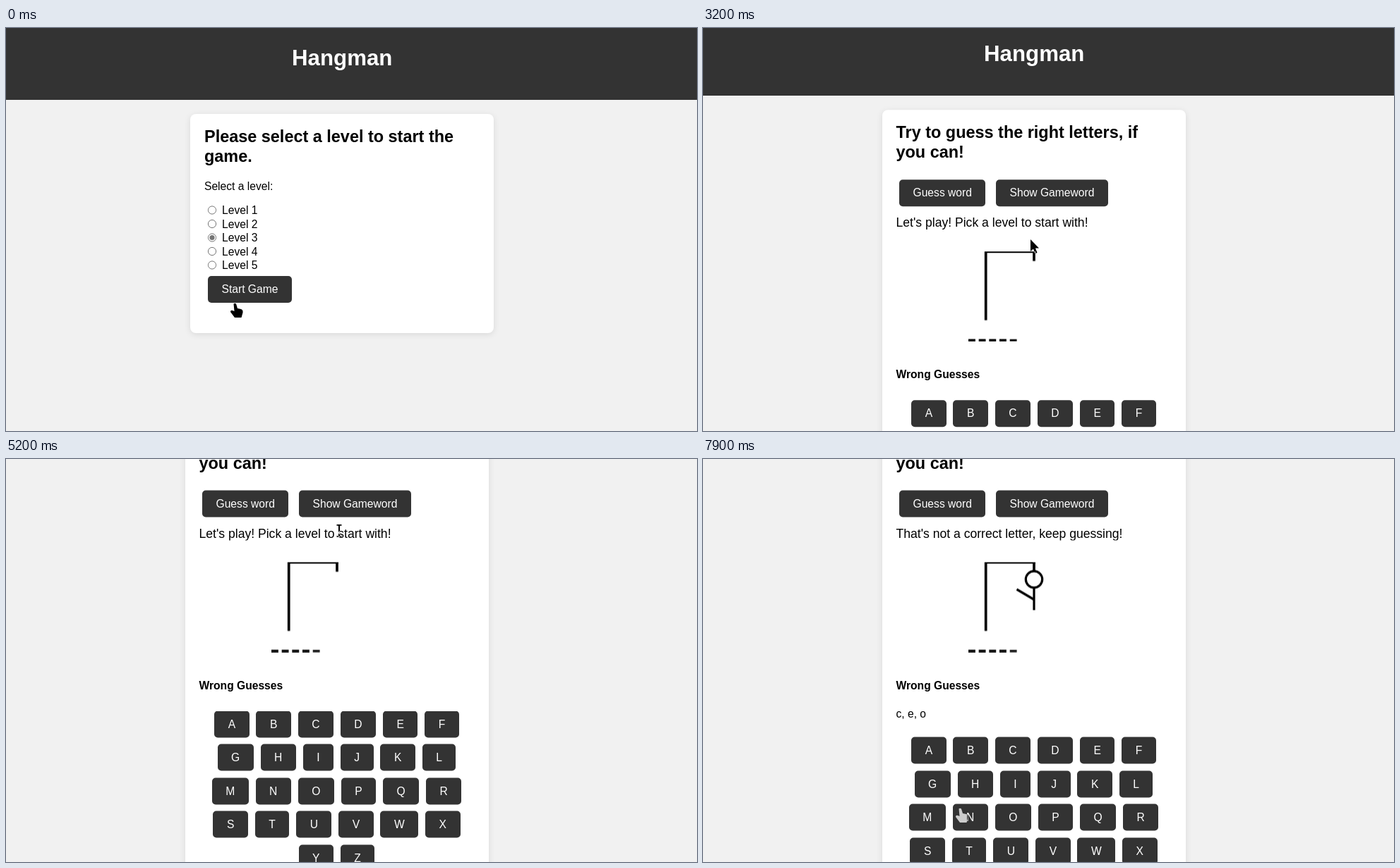
Write an HTML page that moves like this. It is 979 px wide and 572 px high and loops after 8 s.

```html
<!DOCTYPE html>
<html lang="en">
<head>
<meta charset="utf-8">
<title>Hangman</title>
<style>
html, body { margin: 0; width: 100%; height: 100%; overflow: hidden; }
#stage {
  position: relative; width: 979px; height: 572px; overflow: hidden; isolation: isolate;
  background: #f1f1f1; color: #000; font: 15.63px/20px "Liberation Sans", Arial, sans-serif;
}
#stage *, #page { animation-duration: 8s; animation-iteration-count: infinite; animation-timing-function: step-end; }
#page, .view, .view > *, svg { position: absolute; left: 0; top: 0; white-space: nowrap; }
svg { overflow: visible; width: 1px; height: 1px; }
h1, h2, h3 { margin: 0; }
h1 { width: 979px; height: 101.8px; background: #333; color: #fff; font-size: 31.26px; }
h1 span { position: absolute; top: 23px; line-height: 40px; }
.view .card {
  width: 430px; background: #fff; border-radius: 8px; box-shadow: 0 2px 10px rgba(0,0,0,.1);
}
.view h2 { top: 141.2px; font-size: 23.45px; line-height: 27.5px; }
.view h3 { left: 273.5px; font-size: 15.63px; }
.view .say { left: 273.5px; font-size: 17.58px; }
.btn, .keys b {
  padding: 0 19.54px; border-radius: 5px; background: #333; color: #fff;
  font-weight: normal; line-height: 37.7px;
}
.view .levels { left: 306px; top: 249.3px; line-height: 19.55px; }
.view .keys {
  left: 273px; top: 533.8px; width: 391px; display: flex; flex-wrap: wrap;
  justify-content: center; gap: 9.8px 9.77px; animation-name: drop;
}
.view .wrong { left: 273.5px; top: 528px; }

/* page states */
#pick { animation-name: pick; }
#ready { animation-name: ready; }
#play { animation-name: play; }
.before { animation-name: before; }
.miss1 { animation-name: miss1; }
.miss2 { animation-name: miss2; }
.miss3 { animation-name: miss3; }
@keyframes pick { 0% { visibility: visible } 5%, 100% { visibility: hidden } }
@keyframes ready { 0% { visibility: hidden } 5% { visibility: visible } 33.75%, 100% { visibility: hidden } }
@keyframes play { 0% { visibility: hidden } 33.75%, 100% { visibility: visible } }
@keyframes before { 0% { opacity: 1 } 75%, 100% { opacity: 0 } }
@keyframes miss1 { 0% { opacity: 0 } 75%, 100% { opacity: 1 } }
@keyframes miss2 { 0% { opacity: 0 } 82.5%, 100% { opacity: 1 } }
@keyframes miss3 { 0% { opacity: 0 } 93.75%, 100% { opacity: 1 } }
@keyframes drop { 0% { top: 533.8px } 75%, 100% { top: 571.4px } }

#stage #page { animation-name: scroll; animation-timing-function: linear; }
@keyframes scroll {
  0%, 37.5% { transform: none }
  40% { transform: translateY(-5.5px) }
  42.5% { transform: translateY(-60px) }
  45% { transform: translateY(-130px) }
  47.5% { transform: translateY(-170.5px) }
  50%, 100% { transform: translateY(-176.5px) }
}

/* pointer inverts what lies below it */
#stage #pointer { fill: #fff; mix-blend-mode: difference; animation-name: move; animation-timing-function: linear; }
@keyframes move {
  0% { transform: translate(324px, 391px); animation-timing-function: step-end }
  1.25%, 5% { transform: translate(326px, 380px) }
  18.75% { transform: translate(406px, 282px) }
  22.5%, 25% { transform: translate(460px, 303px) }
  26.25%, 40% { transform: translate(464px, 300px) }
  47.5%, 50% { transform: translate(462px, 302px) }
  57.5%, 60% { transform: translate(464px, 263px) }
  65% { transform: translate(472px, 93px) }
  67.5%, 68.75% { transform: translate(470px, 71px) }
  73.75%, 75% { transform: translate(440px, 374px) }
  81.25%, 82.5% { transform: translate(557px, 414px) }
  86.25%, 88% { transform: translate(555px, 438px) }
  92.5%, 93.75% { transform: translate(438px, 505px) }
  98.75%, 100% { transform: translate(364px, 496px) }
}
.hand { animation-name: hand; }
.arrow { animation-name: arrow; }
.beam { animation-name: beam; }
@keyframes hand {
  0% { opacity: 1 } 5% { opacity: 0 } 21.25% { opacity: 1 } 33.75% { opacity: 0 }
  66.25% { opacity: 1 } 69% { opacity: 0 } 73.5% { opacity: 1 } 75% { opacity: 0 } 78.75%, 100% { opacity: 1 }
}
@keyframes arrow {
  0% { opacity: 0 } 5% { opacity: 1 } 21.25% { opacity: 0 } 33.75% { opacity: 1 } 64.4% { opacity: 0 }
  69.5% { opacity: 1 } 73.5% { opacity: 0 } 75% { opacity: 1 } 78.75%, 100% { opacity: 0 }
}
@keyframes beam {
  0% { opacity: 0 } 64.4% { opacity: 1 } 66.25% { opacity: 0 } 69% { opacity: 1 } 69.5%, 100% { opacity: 0 }
}
</style>
</head>
<body>
<div id="stage">
  <div id="page">
    <div class="view" id="pick">
      <h1><span style="left:405px">Hangman</span></h1>
      <div class="card" style="left:261px;top:122px;height:311px"></div>
      <h2 style="left:281px">Please select a level to start the<br>game.</h2>
      <div style="left:281px;top:214.5px">Select a level:</div>
      <svg fill="none" stroke="#767676">
        <circle cx="292" cy="258.5" r="5.6"/>
        <circle cx="292" cy="278" r="5.6"/>
        <circle cx="292" cy="297.5" r="5.6"/>
        <circle cx="292" cy="297.5" r="3.6" fill="#767676" stroke="none"/>
        <circle cx="292" cy="317" r="5.6"/>
        <circle cx="292" cy="336.5" r="5.6"/>
      </svg>
      <div class="levels">Level 1<br>Level 2<br>Level 3<br>Level 4<br>Level 5</div>
      <div class="btn" style="left:286px;top:352px">Start Game</div>
    </div>

    <div class="view" id="ready">
      <h1><span style="left:398px">Hangman</span></h1>
      <div class="card" style="left:254px;top:122px;height:452px"></div>
      <h2 style="left:273.5px">Try to guess the right letters, if<br>you can!</h2>
      <div class="btn" style="left:278px;top:220.8px">Guess word</div>
      <div class="btn" style="left:415px;top:220.8px">Show Gameword</div>
      <div class="say" style="top:286px">Do you want to play?</div>
      <div class="btn" style="left:442.3px;top:278px">Start Game</div>
      <h3 style="top:515.5px">Wrong Guesses</h3>
    </div>

    <div class="view" id="play">
      <h1><span style="left:398px">Hangman</span></h1>
      <div class="card" style="left:254px;top:122px;height:720px"></div>
      <h2 style="left:273.5px">Try to guess the right letters, if<br>you can!</h2>
      <div class="btn" style="left:278px;top:220.8px">Guess word</div>
      <div class="btn" style="left:415px;top:220.8px">Show Gameword</div>
      <div class="say before" style="top:272px">Let's play! Pick a level to start with!</div>
      <div class="say miss1" style="top:272px">That's not a correct letter, keep guessing!</div>
      <svg fill="none" stroke="#000" stroke-width="3.7">
        <path d="M400.7 323V420.5M469 323V336.5"/>
        <path d="M399 324H471" stroke-width="2"/>
        <path d="M376 449H431" stroke-dasharray="9.9 4.76"/>
        <path d="M434.7 449H444.6" stroke-width="3"/>
        <circle class="miss1" cx="469" cy="347.3" r="11.7" stroke-width="3.2"/>
        <path class="miss2" d="M469 359V391" stroke-width="3.2"/>
        <path class="miss3" d="M444.5 361.5L469 376" stroke-width="3.2"/>
      </svg>
      <h3 style="top:488.3px">Wrong Guesses</h3>
      <div class="wrong"><span class="miss1">c</span><span class="miss2">, e</span><span class="miss3">, o</span></div>
      <div class="keys">
        <b>A</b><b>B</b><b>C</b><b>D</b><b>E</b><b>F</b>
        <b>G</b><b>H</b><b>I</b><b>J</b><b>K</b><b>L</b>
        <b>M</b><b>N</b><b>O</b><b>P</b><b>Q</b><b>R</b>
        <b>S</b><b>T</b><b>U</b><b>V</b><b>W</b><b>X</b>
        <b>Y</b><b>Z</b>
      </div>
    </div>
  </div>

  <svg id="pointer">
    <path class="hand" d="M-1.5 .5Q0-1 2 .5L4 7 9 8Q12 9 11.5 13L9.5 20H0L-6 12Q-6 9-3 10L-.5 11Z"/>
    <path class="arrow" d="M0 0V17L4 13.5 6.5 20 9.5 19 7 12.5H12Z"/>
    <path class="beam" d="M-3.5 0H3.5V1.8H1V16.2H3.5V18H-3.5V16.2H-1V1.8H-3.5Z"/>
  </svg>
</div>
</body>
</html>
```
